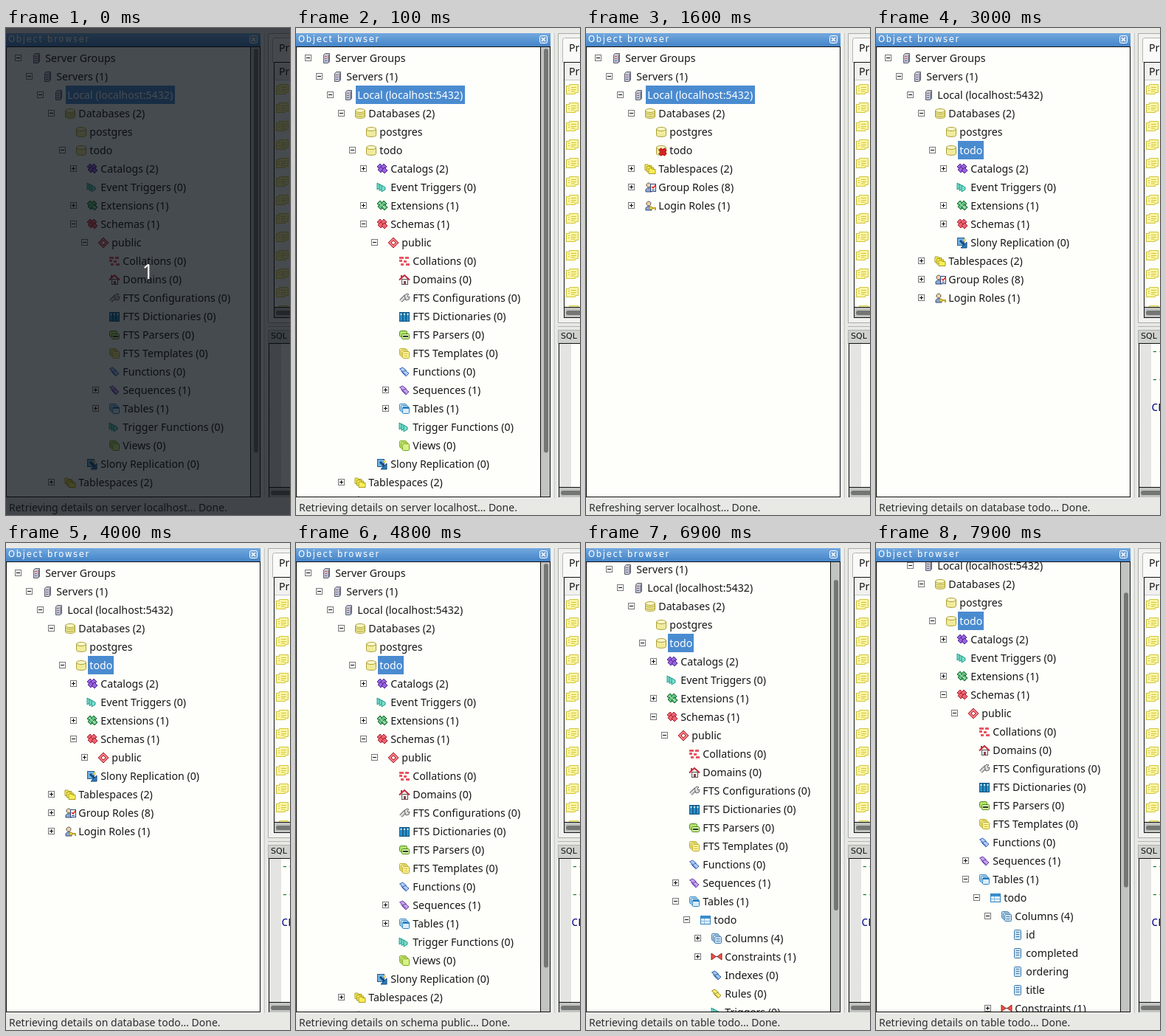
An HTML page that plays this animation: 385x660 px, repeating every 8000 ms.

```html
<!DOCTYPE html>
<html lang="en">
<head>
<meta charset="utf-8">
<title>Object browser</title>
<style>
html, body { margin: 0; width: 100%; height: 100%; overflow: hidden; background: #e8e9e5; }
svg { display: block; }
text { font: 14.2px "Noto Sans", sans-serif; fill: #161616; white-space: pre; }
.status { font-size: 14px; fill: #2b2d2e; }
.caption { font: 11.5px "DejaVu Sans", sans-serif; letter-spacing: 1.7px; fill: #fff; }
.pane { font: 11px "DejaVu Sans", sans-serif; fill: #111; }
.code { font: 14.6px "Noto Sans Mono", monospace; fill: #117a28; }
.code .word { fill: #00007f; }
.selected { fill: #fff; }
.count { font-size: 27px; fill: #fff; text-anchor: middle; }
</style>
</head>
<body>
<svg width="385" height="660" viewBox="0 0 385 660">
  <defs>
    <linearGradient id="bar" x2="0" y2="1">
      <stop stop-color="#72a8de"/><stop offset="1" stop-color="#4484c8"/>
    </linearGradient>
    <pattern id="hatch" width="2" height="2" patternUnits="userSpaceOnUse">
      <path d="M0 0h2v2h-2z" fill="#f6f6f4"/><path d="M0 0h1v1h-1zM1 1h1v1h-1z" fill="#d2d3d0"/>
    </pattern>
    <clipPath id="view"><rect x="1" y="26" width="343" height="609"/></clipPath>
    <clipPath id="list"><rect x="364" y="48" width="21" height="330"/></clipPath>
  </defs>
  <g id="right"></g>
  <rect y="7" width="345" height="18" fill="url(#bar)"/>
  <text class="caption" x="3" y="19">Object browser</text>
  <rect x="330.5" y="10.5" width="10" height="10" rx="2" fill="#6da2da" stroke="#fff"/>
  <path d="M333 13l5 5m0-5l-5 5" stroke="#fff" stroke-width="1.6"/>
  <rect x=".5" y="25.5" width="344" height="610" fill="#fefffb" stroke="#111"/>
  <g id="tree" clip-path="url(#view)"></g>
  <g id="extras"></g>
</svg>
<script>
const LOOP = 8000, ROW = 25, CLOSED = 9;
const byId = id => document.getElementById(id);
const rect = (x, y, w, h, fill, stroke = 'none', rx = 0) =>
  `<rect x="${x}" y="${y}" width="${w}" height="${h}" rx="${rx}" fill="${fill}" stroke="${stroke}"/>`;
const path = (d, fill, stroke = 'none', width = 1) =>
  `<path d="${d}" fill="${fill}" stroke="${stroke}" stroke-width="${width}"/>`;
const text = (x, y, label, name = '') => `<text x="${x}" y="${y}" class="${name}">${label}</text>`;

// Icons are drawn in a 16 by 16 box.
const diamond = (x, y, r, fill, stroke) =>
  path(`M${x} ${y - r}l${r} ${r}l${-r} ${r}l${-r} ${-r}z`, fill, stroke);
const diamonds = (fill, stroke) =>
  [[5, 5], [10, 5], [6, 9], [11, 10]].map(([x, y]) => diamond(x, y, 4, fill, stroke)).join('');
const sheets = (fill, stroke, mark = '') =>
  [0, 2, 4].map(d => rect(1.5 + d, 1.5 + d, 9, 9, fill, stroke, 1)).join('') + mark;
const tower = (a, b) =>
  path('M3.5 3.5l2-2h6v11l-2 2h-6z', '#c6c8d4', '#5b5d6b') +
  path('M9.5 4v10l2-2V2z', '#74768a') + path('M5 5.5h3M5 8.500h3', 'none', a) + path('M5 11.500h3', 'none', b);
const cylinder = rings =>
  path('M1.500 4v8.500c0 2.500 13 2.500 13 0V4', '#f1ec9c', '#aca035') +
  '<ellipse cx="8" cy="4" rx="6.500" ry="2.500" fill="#faf7c8" stroke="#aca035"/>' +
  rings.map(y => path(`M1.500 ${y}c0 2.500 13 2.500 13 0`, 'none', '#aca035')).join('');
const arrows = (fill, stroke) =>
  [0, 3, 6].map(d => path(`M${1 + d} ${2 + d / 2}l5 3v3l-5 3z`, fill, stroke)).join('');
const slabs = (fill, stroke) =>
  path('M1.500 4l4-2 5 4-3 3z', fill, stroke) + path('M5 9l4-3 5 4-4 4z', fill, stroke) + path('M3 7l7 5', 'none', stroke);
const person =
  path('M2 14v-3c1-3 7-3 8 0v3z', '#8fa9cf', '#3b4f78') + path('M6 2a3 3 0 1 1-.1 0', '#f2d2a8', '#55504a');
const folder = (x, y) => path(`M${x} ${y}h4l1 1.500h4v6h-9z`, '#f9ee58', '#ab9d1e');
const page =
  rect(3.5, 1.5, 9, 13, '#cfe4f5', '#3f7aa8', 1) + path('M5.500 4.500h5M5.500 7.500h5M5.500 10.500h5', 'none', '#3f7aa8');

const icons = {
  group: tower('#d84848', '#3468c8'),
  server: tower('#8a5f74', '#4b5f9a'),
  databases: cylinder([7, 10]),
  database: cylinder([]),
  catalogs: diamonds('#9a62dd', '#4c2592'),
  schemas: diamonds('#ec6470', '#a51f2c'),
  schema: diamond(8, 8, 7, '#f07c80', '#b01f2a') + diamond(8, 8, 3, '#fff', '#b01f2a'),
  extensions: diamonds('#5fc27c', '#125f2c') + path('M4 4l8 7', 'none', '#fff'),
  teal: arrows('#7fdccb', '#1b9c8c'),
  collations: [[1, 2, 6], [9, 2, 5], [1, 6, 4], [7, 7, 4], [3, 11, 4], [10, 11, 5]]
    .map(([x, y, w]) => rect(x, y, w, 3, '#e65661')).join(''),
  domains: rect(4.5, 7.5, 8, 7, '#f4f1ee', '#555') + path('M1 8.500l7-6.500 7 6.500', 'none', '#c2273a', 2) +
    rect(7, 10, 3, 5, '#8b4a4a') + rect(3, 2, 2, 4, '#b33'),
  wrench: path('M3 12l7-7', 'none', '#666', 5) + path('M3 12l7-7', 'none', '#ddd', 3) +
    path('M8 5l3-3 3 1-2 2 1 2 2-1-1 4-4 1z', '#ddd', '#666'),
  books: [1.5, 6, 10.5].map(x => rect(x, 2.5, 4, 12, '#2d91ca', '#13547f') + rect(x + 1, 4, 2, 2, '#c3e8fa')).join(''),
  parsers: rect(1.5, 2.5, 10, 8, '#b5e46f', '#4d8b1a', 2) + rect(4.5, 6.5, 10, 7, '#d5f2a4', '#4d8b1a', 1) +
    path('M6 10h7', 'none', '#333', 2),
  templates: sheets('#fbf4a2', '#b9a620', path('M7.500 8.500h5M7.500 11.500h5', 'none', '#d0b91c')),
  functions: slabs('#b4cdf8', '#3160b4'),
  sequences: slabs('#c6a4ee', '#673aa6'),
  tables: sheets('#d8edfb', '#2f82c0', path('M6 7h8', 'none', '#2f82c0', 2)),
  table: rect(1.5, 2.5, 13, 11, '#e3f2fc', '#2f82c0') + rect(2, 3, 12, 3, '#3a8fce') +
    path('M6.500 6v7M2 9.500h12', 'none', '#8abbe0'),
  views: sheets('#d7f188', '#78a51f'),
  slony: rect(1.5, 1.5, 9, 10, '#6fb1e0', '#2a5f93') + path('M5 5l6 6', 'none', '#194a7c', 3) +
    path('M14 7v8H6z', '#2c79b8', '#194a7c') + rect(10, 3, 3, 3, '#e9d560'),
  spaces: folder(1, 2) + folder(3.5, 4.5) + folder(6, 7),
  groupRoles: person + rect(8.5, 3.5, 7, 10, '#fff', '#27457e') + path('M10 7l2 2 3-4', 'none', '#d22', 1.5) +
    path('M10 11.500h4', 'none', '#27457e'),
  loginRoles: person + path('M9 11h6v3', 'none', '#c5a61b', 2) + '<circle cx="9" cy="11" r="2" fill="#f4dd58" stroke="#a98c12"/>',
  columns: sheets('#cfe4f5', '#3f7aa8', path('M7.500 8.500h5M7.500 11.500h5', 'none', '#3f7aa8')),
  column: page,
  constraints: path('M1 3v9l6-4.500z', '#ec5548', '#9a2119') + path('M15 3v9l-6-4.500z', '#ec5548', '#9a2119') + path('M6 7.500h4', 'none', '#444'),
  indexes: slabs('#9dc6f0', '#255e9c'),
  rules: slabs('#f6ec78', '#a4941c')
};

// depth, icon, label, and how many openings it takes to unfold (none for a leaf)
const nodes = [
  [0, 'group', 'Server Groups', 0], [1, 'server', 'Servers (1)', 0],
  [2, 'server', 'Local (localhost:5432)', 0], [3, 'databases', 'Databases (2)', 0],
  [4, 'database', 'postgres'], [4, 'database', 'todo', 1],
  [5, 'catalogs', 'Catalogs (2)', CLOSED], [5, 'teal', 'Event Triggers (0)'],
  [5, 'extensions', 'Extensions (1)', CLOSED], [5, 'schemas', 'Schemas (1)', 2],
  [6, 'schema', 'public', 3],
  [7, 'collations', 'Collations (0)'], [7, 'domains', 'Domains (0)'],
  [7, 'wrench', 'FTS Configurations (0)'], [7, 'books', 'FTS Dictionaries (0)'],
  [7, 'parsers', 'FTS Parsers (0)'], [7, 'templates', 'FTS Templates (0)'],
  [7, 'functions', 'Functions (0)'], [7, 'sequences', 'Sequences (1)', CLOSED],
  [7, 'tables', 'Tables (1)', 4], [8, 'table', 'todo', 5],
  [9, 'columns', 'Columns (4)', 6],
  ...['id', 'completed', 'ordering', 'title'].map(name => [10, 'column', name]),
  [9, 'constraints', 'Constraints (1)', CLOSED], [9, 'indexes', 'Indexes (0)'],
  [9, 'rules', 'Rules (0)'], [9, 'teal', 'Triggers (0)'],
  [7, 'teal', 'Trigger Functions (0)'], [7, 'views', 'Views (0)'],
  [5, 'slony', 'Slony Replication (0)'], [3, 'spaces', 'Tablespaces (2)', CLOSED],
  [3, 'groupRoles', 'Group Roles (8)', CLOSED], [3, 'loginRoles', 'Login Roles (1)', CLOSED]
];
const LOCAL = nodes[2], TODO = nodes[5];

const details = what => `Retrieving details on ${what}... Done.`;
// Each step changes only the listed parts of the state before it.
const steps = [
  [0, { opened: 3, chosen: LOCAL, online: true, scroll: 0, status: details('server localhost'), dim: true }],
  [100, { dim: false }],
  [500, { menu: 0.6 }],
  [600, { menu: 1 }],
  [1000, { hover: true }],
  [1500, { menu: 0, hover: false, status: 'Refreshing server localhost...' }],
  [1600, { opened: 0, online: false, status: 'Refreshing server localhost... Done.' }],
  [2400, { chosen: TODO }],
  [2500, { online: true, sql: true, status: details('database todo') }],
  [3000, { opened: 1 }],
  [4000, { opened: 2 }],
  [4600, { status: details('schema public') }],
  [4800, { opened: 3 }],
  [5900, { opened: 4 }],
  [6200, { scroll: 30 }],
  [6800, { status: details('table todo') }],
  [6900, { opened: 5 }],
  [7500, { scroll: 60 }],
  [7900, { opened: 6 }]
];
let last = {};
const states = steps.map(([at, change]) => last = { ...last, ...change, at });

function visibleNodes(opened) {
  let folded = Infinity;
  return nodes.filter(([depth, , , level = 0]) => {
    if (depth > folded) return false;
    folded = level > opened ? depth : Infinity;
    return true;
  });
}

function drawRow(node, y, state) {
  const [depth, icon, label, level] = node, x = 15 * depth;
  const offline = node === TODO && !state.online;
  let out = `<g transform="translate(${34 + x} ${y - 8})">${icons[icon]}` +
    (offline ? path('M6 6l8 8m0-8l-8 8', 'none', '#8d1010', 5) + path('M6 6l8 8m0-8l-8 8', 'none', '#d82424', 3.4) : '') + '</g>';
  if (level !== undefined && !offline) {
    out += rect(12.5 + x, y - 4.5, 8, 8, '#fff', '#777') +
      path(`M${14 + x} ${y - .5}h5` + (level > state.opened ? `M${16.5 + x} ${y - 3}v5` : ''), 'none', '#000');
  }
  const chosen = node === state.chosen;
  if (chosen) out += rect(51 + x, y - 13, node === LOCAL ? 148 : 35, 25, state.menu ? '#a7a9a4' : '#4a8bd0');
  return out + text(53.3 + x, y + 5, label, chosen ? 'selected' : '');
}

function drawScrollbar(count, scroll) {
  const content = count * ROW + 24;
  if (content < 640) return '';
  const scale = 605 / content;
  return rect(332, 26, 12, 609, '#c1c4c1') + path('M331.500 26v609', 'none', '#111') +
    rect(336, 28 + scroll * scale, 6, 610 * scale, '#747674', 'none', 3);
}

function drawMenu({ menu, hover }) {
  if (!menu) return '';
  const items = ['Refresh', 'New Object', '', 'Disconnect server', 'Delete/Drop...', 'Change password...', '',
    'Reload configuration', 'Reports', '', 'Properties...'];
  let y = 92;
  const body = items.map(label => {
    const top = y;
    y += label ? 30 : 10;
    if (!label) return path(`M178 ${top + 5.5}h207`, 'none', '#c4c5c2');
    const lit = hover && top === 92;
    return (lit ? rect(176, 92, 209, 28, '#4a8bd0') : '') + text(204, top + 19, label, lit ? 'selected' : '');
  }).join('');
  return `<g opacity="${menu}">${rect(174.5, 90.5, 220, 277, '#f5f6f3', '#8d8f8b')}${body}</g>`;
}

function draw(state) {
  const shown = visibleNodes(state.opened);
  byId('tree').innerHTML = shown
    .map((node, i) => drawRow(node, 41 + i * ROW - state.scroll, state)).join('') +
    drawScrollbar(shown.length, state.scroll);
  const sql = state.sql
    ? text(373.5, 443, '-- Database: todo', 'code') + text(373.5, 481, '-- DROP DATABASE todo;', 'code') +
      '<text x="373.5" y="519" class="code"><tspan class="word">CREATE DATABASE</tspan></text>'
    : '';
  byId('extras').innerHTML = text(4, 655, state.status, 'status') + sql + drawMenu(state) +
    (state.dim ? rect(0, 0, 385, 660, 'rgba(8,13,20,.74)') + text(192.5, 340, '1', 'count') : '');
}

function drawRight() {
  const note = y => path(`M366.500 ${y + 3.5}h4v-2h12v11h-4v2h-12z`, '#faf5a4', '#d3c63a') +
    path(`M369 ${y + 6.5}h2M373 ${y + 5.5}h7M369 ${y + 9.5}h2M373 ${y + 8.5}h7M373 ${y + 11}h5`, 'none', '#d3c63a');
  const thumb = (x, y) => rect(x, y, 40, 6, '#747674', 'none', 3);
  byId('right').innerHTML =
    path('M347.500 7v630', 'none', '#f8f8f6') + path('M350.500 7v630', 'none', '#c9cac6') +
    path('M390 7.500h-34.500v392h35', '#f1f2ef', '#a9aba7') +
    path('M390 46.500h-28.500v-30q0-3 3-3h26', '#fafaf8', '#b4b6b2') + text(370, 32, 'Properties') +
    rect(363.5, 46.500, 40, 346, '#fefffb', '#111') + rect(364, 47, 30, 23, '#f1f2ef') +
    path('M364 70.500h21', 'none', '#c9cac6') + text(370, 64, 'Property') +
    `<g clip-path="url(#list)">${Array.from({ length: 13 }, (_, i) => note(75 + i * ROW)).join('')}</g>` +
    rect(364, 379, 21, 13, '#c1c4c1') + path('M363 378.500h22', 'none', '#111') + thumb(366, 383) +
    path('M355 404.500h30', 'none', '#b4b6b2') +
    rect(355.5, 409.5, 40, 18, '#cfd1cd', '#b0b2ae') + text(359, 421, 'SQL pane', 'pane') +
    rect(356.5, 427.5, 40, 208, '#fefffb', '#111') + rect(357, 428, 16, 195, 'url(#hatch)') +
    rect(357, 623, 28, 13, '#c1c4c1') + path('M356 622.500h29', 'none', '#111') + thumb(359, 627);
}

drawRight();
let current, start;
function tick(now) {
  start ??= now;
  const time = (now - start) % LOOP;
  const state = states.findLast(({ at }) => at <= time);
  if (state !== current) draw(current = state);
  requestAnimationFrame(tick);
}
draw(current = states[0]);
requestAnimationFrame(tick);
</script>
</body>
</html>
```
